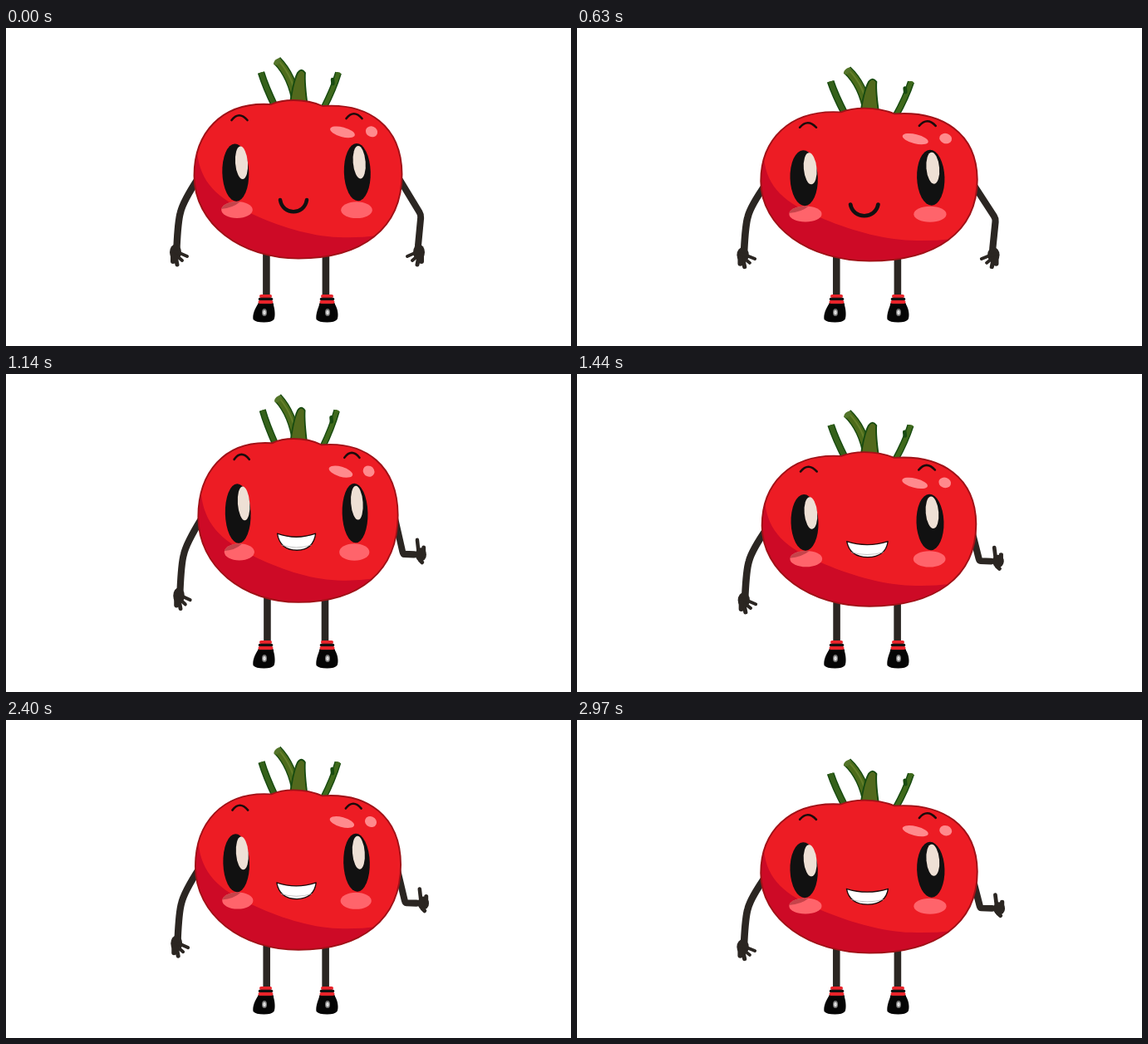
Recreate the animation shown at these times as an HTML page with a canvas. Size 680x383 px, loop 3000 ms.

```html
<!DOCTYPE html>
<html lang="en">
<head>
<meta charset="utf-8">
<title>Tomato</title>
<style>
html, body { margin: 0; width: 100%; height: 100%; overflow: hidden; background: #fff; }
canvas { display: block; width: 680px; height: 383px; }
</style>
</head>
<body>
<canvas id="stage" width="680" height="383"></canvas>
<script>
const ctx = document.getElementById('stage').getContext('2d');
const LOOP = 3000, STEP = 30, GRIN_AT = 750, FIST_AT = 960;
const CX = 351.5, GROUND = 362;
const LIMB = '#2b2622', INK = '#111', STEM_EDGE = '#174a10';

// [ms, height of the stalk tip]
const bounce = [[-260, 48], [130, 32], [540, 48], [620, 47.3], [740, 53],
  [1060, 24], [1570, 48], [2285, 32], [3060, 48]];

// [ms, elbow x, y, wrist x, y, hand angle]
const DOWN = [499.5, 225, 496, 262, 0], THUMB = [481.5, 221.5, 495, 222, 0];
const armKeys = [[0, ...DOWN], [700, ...DOWN], [870, 521, 197, 525, 206, .64],
  [945, 514, 201, 529, 192, -.9], [1065, ...THUMB], [LOOP, ...THUMB]];

const body = new Path2D('M319 92C328 88 337 87 346 87C361 87 372 90 381 94' +
  'C436 90 476 118 476.5 176C476.5 242 428 277.6 352 277.6' +
  'C283 277.6 226.5 236 226.5 178C226.5 128 258 88 319 92Z');
const shade = new Path2D('M222 140L230 150C234 186 254 205 294 223' +
  'C326 238 366 251 400 252Q425 253 447 250L458 242L480 290L220 290Z');
const grin = new Path2D('M325.5 197.5Q349 205.5 373.5 197.5Q371 216.5 350 217Q329 217 325.5 197.5Z');

function ease(keys, t) {
  let i = 1;
  while (i < keys.length - 1 && t > keys[i][0]) i++;
  const a = keys[i - 1], b = keys[i];
  const u = Math.min(1, Math.max(0, (t - a[0]) / (b[0] - a[0])));
  const e = (1 - Math.cos(Math.PI * u)) / 2;
  return a.slice(1).map((v, j) => v + (b[j + 1] - v) * e);
}

function oval(x, y, rx, ry, color, turn = 0) {
  ctx.beginPath();
  ctx.ellipse(x, y, rx, ry, turn, 0, Math.PI * 2);
  ctx.fillStyle = color;
  ctx.fill();
}

function line(d, width, color, cap = 'round') {
  ctx.lineWidth = width;
  ctx.strokeStyle = color;
  ctx.lineCap = cap;
  ctx.lineJoin = 'round';
  ctx.stroke(new Path2D(d));
}

function shape(path, fill, stroke, width) {
  ctx.fillStyle = fill;
  ctx.fill(path);
  ctx.lineWidth = width;
  ctx.strokeStyle = stroke;
  ctx.lineJoin = 'round';
  ctx.stroke(path);
}

function squash(k, spread) {
  ctx.translate(CX, GROUND);
  ctx.scale(1 + spread * k, 1 - .0353 * k);
  ctx.translate(-CX, -GROUND);
}

function layer(draw) {
  ctx.save();
  draw();
  ctx.restore();
}

function openHand(x, y, angle, side) {
  layer(() => {
    ctx.translate(x, y);
    ctx.rotate(angle);
    ctx.scale(side, 1);
    oval(1, 8, 7, 9.5, LIMB);
    line('M4 7L-4 9L-13 13', 4, LIMB);
    line('M0 12L-7 18', 4, LIMB);
    line('M1 13L-1 23', 5, LIMB);
    line('M4 11L4 19', 6, LIMB);
  });
}

function fist(x, y, angle) {
  layer(() => {
    ctx.translate(x, y);
    ctx.rotate(angle);
    line('M6 0L4 -17', 4.6, LIMB);
    oval(8.5, 0, 6.8, 8, LIMB);
    line('M12 -8L12 2', 5, LIMB);
    line('M7 6L10 9', 5, LIMB);
  });
}

function arms(t) {
  line('M232 180Q213 209 210 222Q207 232 205.5 264', 8.4, LIMB);
  openHand(205, 262, 0, -1);
  const [ex, ey, wx, wy, angle] = ease(armKeys, t);
  const mx = 471 + (ex - 471) * .93, my = 178 + (ey - 178) * .93;
  const nx = ex + (wx - ex) * .1, ny = ey + (wy - ey) * .1;
  line(`M471 178L${mx} ${my}Q${ex} ${ey} ${nx} ${ny}L${wx} ${wy}`, 8, LIMB);
  if (t < FIST_AT) openHand(wx, wy, angle, 1);
  else fist(wx, wy, angle);
}

function leg(x, k) {
  const lx = CX + (x - CX) * (1 + .03 * k);
  line(`M${lx} 266L${lx} 324`, 8.6, LIMB, 'butt');
}

function shoe(x, tilt) {
  const sx = x + tilt;
  line(`M${sx - 5.5} 323L${sx + 5.5} 323`, 4, '#e8232a');
  line(`M${sx - 7} 326.5L${sx + 7} 326.5`, 3.5, INK);
  line(`M${sx - 7} 333L${sx + 7} 333`, 5, INK);
  line(`M${sx - 7} 330L${sx + 7} 330`, 4, '#e8232a');
  const p = new Path2D(`M${sx - 9} 332Q${sx} 334 ${sx + 9} 332` +
    `C${x + 13} 338 ${x + 14} 347 ${x + 12} 351Q${x + 9} 354.5 ${x} 354.5` +
    `Q${x - 10} 354.5 ${x - 13} 351C${x - 14} 345 ${x - 11} 338 ${sx - 9} 332Z`);
  ctx.fillStyle = '#050505';
  ctx.fill(p);
  oval(x + .5, 342.5, 3, 4.5, '#777');
  oval(x + .5, 342.5, 1.8, 2.8, '#ddd');
}

function stem(d, width, color) {
  line(d, width, STEM_EDGE, 'butt');
  line(d, width - 2.8, color, 'butt');
}

function stalk() {
  stem('M307 53.5Q312 70 324 95', 8.5, '#35611a');
  stem('M326 39Q345 58 350 92', 11.5, '#4c6b1b');
  line('M329.5 41Q346 60 350 88', 2, '#647f2a', 'butt');
  oval(326.5, 40.5, 5.2, 3, '#54752a', -.75);
  shape(new Path2D('M341.5 95Q345 66 351 54Q355.5 47.5 360 54Q359 66 363 95Z'),
    '#52691d', STEM_EDGE, 1.8);
  stem('M400 54Q394 74 382 97', 8, '#3f6a1c');
  line('M393 62L393.5 67', 4.5, STEM_EDGE);
  oval(400, 55, 3, 1.8, '#3f6a1c', .2);
}

function eye(x, y, gx, gy) {
  oval(x, y, 16, 34.7, INK, -.03);
  oval(gx, gy, 7.5, 19.8, '#eee0d5', -.08);
}

function cheek(x, y) {
  oval(x, y, 18.8, 9.9, '#ff646b');
}

function brow(x, y) {
  line(`M${x - 9.5} ${y - .5}Q${x - .5} ${y - 12} ${x + 9.5} ${y - .5}`, 2.6, '#1c0b0b');
}

function face(t) {
  cheek(278, 219);
  layer(() => {
    ctx.beginPath();
    ctx.ellipse(278, 219, 18.8, 9.9, 0, 0, Math.PI * 2);
    ctx.clip();
    ctx.fillStyle = '#c6434a';
    ctx.fill(new Path2D('M258 205L286 205Q276 217 258 218Z'));
  });
  cheek(422, 219.2);
  eye(276.3, 174.1, 283.5, 162.3);
  eye(422.8, 173.6, 425.2, 161.7);
  brow(281, 111.5);
  brow(419, 109.5);
  oval(405, 125.3, 15.3, 5.8, '#ff8a8d', .26);
  oval(440, 124.8, 7.3, 6.3, '#ff8a8d', .4);
  if (t < GRIN_AT) {
    line('M330 207C333 226 359 226 362 207', 4.6, INK);
  } else {
    shape(grin, '#fff', '#1a0a0a', 1.3);
    line('M331 211Q349 216.5 368 211', .7, '#aaa');
  }
}

function draw(t) {
  const k = (ease(bounce, t)[0] - 36) / 11.5;
  ctx.fillStyle = '#fff';
  ctx.fillRect(0, 0, 680, 383);
  leg(313.4, k);
  leg(384.9, k);
  shoe(310.5, 2);
  shoe(386.5, 0);
  layer(() => {
    squash(k, .03);
    arms(t);
  });
  layer(() => {
    squash(k, .042);
    stalk();
    ctx.fillStyle = '#ed1c24';
    ctx.fill(body);
    layer(() => {
      ctx.clip(body);
      ctx.fillStyle = '#cd0a26';
      ctx.fill(shade);
    });
    ctx.lineWidth = 1.9;
    ctx.strokeStyle = '#a01117';
    ctx.stroke(body);
    face(t);
  });
}

const start = performance.now();
function tick() {
  const t = (performance.now() - start) % LOOP;
  draw(Math.floor(t / STEP) * STEP);
  requestAnimationFrame(tick);
}
tick();
</script>
</body>
</html>
```
